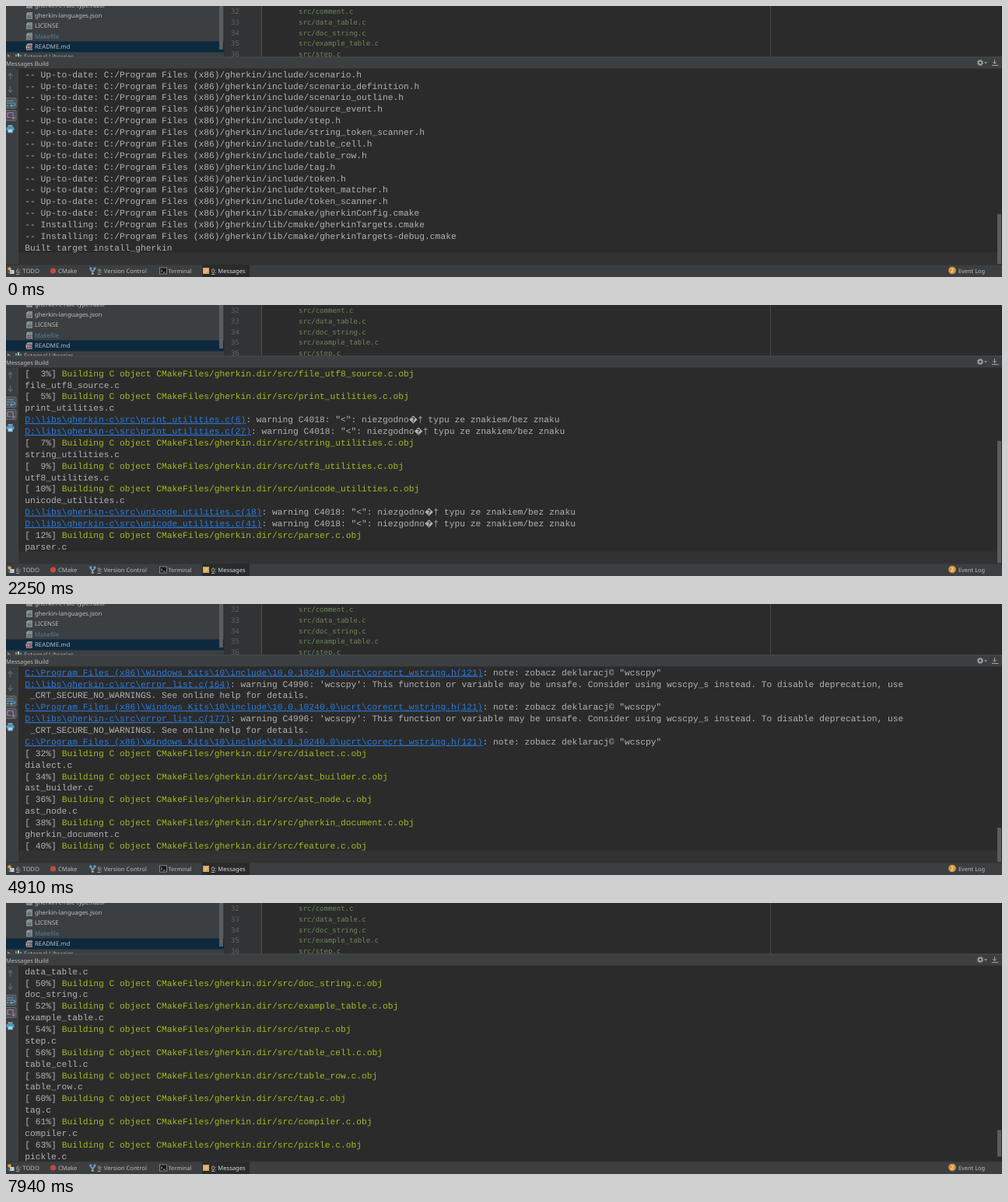
An HTML page that plays this animation: 1280 px wide and 349 px high, repeating every 8000 ms.

```html
<!DOCTYPE html>
<html lang="en">
<head>
<meta charset="utf-8">
<title>Messages Build</title>
<style>
  html, body { margin: 0; width: 100%; height: 100%; overflow: hidden; background: #2b2b2b; }
  svg { display: block; width: 1280px; height: 349px; }
  text { white-space: pre; text-rendering: geometricPrecision; }
  .ui { font-family: "Noto Sans", "Open Sans", sans-serif; font-size: 7.8px; fill: #bbb; }
  .bar { font-size: 7.6px; }
  .code { font-family: "DejaVu Sans Mono", monospace; font-size: 9px; fill: #6a8759; }
  .code .num { fill: #606366; }
  .log { font-family: "Liberation Mono", monospace; font-size: 11.27px; fill: #b2b2b2; }
  .build { fill: #a3b922; }
  .scan { fill: #ae8abe; font-weight: bold; }
  .link { fill: #287bde; text-decoration: underline; }
  .key { text-decoration: underline; }
</style>
</head>
<body>
<svg viewBox="0 0 1280 349">
  <defs>
    <clipPath id="topClip"><rect width="1280" height="65.5"/></clipPath>
    <clipPath id="logClip"><rect x="16" y="81" width="1264" height="251.5"/></clipPath>
    <g id="file">
      <path d="M2.5 0H8V9H0V2.5z" fill="#7f898f"/>
      <path d="M0 2.5L2.5 0V2.5z" fill="#aab2b7"/>
    </g>
  </defs>

  <!-- project tree and editor -->
  <g clip-path="url(#topClip)">
    <rect width="280" height="66" fill="#3c3f41"/>
    <rect y="45.5" width="280" height="14" fill="#0d293e"/>
    <rect x="274" width="5" height="56" fill="#5b5d5f"/>
    <rect x="280" width="1" height="66" fill="#2f3133"/>
    <rect x="281" width="47" height="66" fill="#313335"/>
    <rect x="328" width="1" height="66" fill="#505050"/>
    <rect x="982" width="1" height="66" fill="#4a4a4a"/>
    <g class="ui">
      <use href="#file" x="26" y="-6"/>
      <use href="#file" x="26" y="8"/>
      <use href="#file" x="26" y="21"/>
      <use href="#file" x="26" y="34.5"/>
      <use href="#file" x="26" y="48"/>
      <path d="M27.5 13h5M27.5 15h5M27.5 26h5M27.5 28h5M27.5 39.5h5M27.5 41.5h5" stroke="#4c5459" stroke-width=".8"/>
      <rect x="25" y="51" width="9" height="4.5" fill="#7d4a52"/>
      <path d="M26.5 54.7v-2.7l1.5 1.5 1.5-1.5v2.7M32 52v2.5" stroke="#ddd" stroke-width=".7" fill="none"/>
      <text x="37" y="2">gherkin-c-rule-type.razor</text>
      <text x="37" y="15.3">gherkin-languages.json</text>
      <text x="37" y="28.4">LICENSE</text>
      <text x="37" y="41.8" fill="#527ca2">Makefile</text>
      <text x="37" y="55.1">README.md</text>
      <path d="M2 62.5l4 2.5-4 2.5z" fill="#9a9da0"/>
      <path d="M12 62h2v6h-2z" fill="#6fa35c"/>
      <path d="M15 61h2v7h-2z" fill="#b9c0c5"/>
      <path d="M18 63h2v5h-2z" fill="#4f9fc9"/>
      <text x="23" y="68.3">External Libraries</text>
    </g>
    <g class="code" id="editor"></g>
  </g>

  <!-- tool window header -->
  <rect y="65.5" width="1280" height="15.5" fill="#3c3f41"/>
  <rect y="65.5" width="1280" height="1" fill="#4a4d4f"/>
  <rect y="80" width="1280" height="1" fill="#323436"/>
  <text class="ui" x="0" y="76.6" style="font-size:7.5px">Messages Build</text>
  <circle cx="1252" cy="73" r="2.4" fill="none" stroke="#a0a2a4" stroke-width="1.6"/>
  <circle cx="1252" cy="73" r="3.7" fill="none" stroke="#a0a2a4" stroke-dasharray="1.45 1.456"/>
  <path d="M1257 72.2h4l-2 2.4z" fill="#a0a2a4"/>
  <path d="M1270.5 69v5M1268.3 72l2.2 2.4 2.2-2.4M1267 76.5h8.5" fill="none" stroke="#a0a2a4"/>

  <!-- side buttons -->
  <rect y="81" width="16" height="252" fill="#3c3f41"/>
  <path d="M5.5 94.5v-7M2.5 90l3-3.2 3 3.2M5.5 103.5v7M2.5 108l3 3.2 3-3.2" fill="none" stroke="#626567" stroke-width="1.4"/>
  <g fill="#4c5052" stroke="#6b6e70">
    <rect x="-.5" y="118.5" width="13.5" height="13" rx="1.5"/>
    <rect x="-.5" y="134.5" width="13.5" height="13" rx="1.5"/>
  </g>
  <path d="M1 122h9M1 125h8.5q2 0 2 1.7t-2 1.7H6M1 128.4h2.5M7.5 126.7l-2 1.7 2 1.7" fill="none" stroke="#5fa4cc" stroke-width="1.1"/>
  <path d="M2 137.5h7v4M2 137.5v6h4M9.5 141v4M7.5 143.3l2 2 2-2" fill="none" stroke="#a874b8" stroke-width="1.2"/>
  <rect x="2.5" y="153.5" width="6" height="2" fill="#8bb8d2"/>
  <rect x=".5" y="156" width="10" height="4.5" rx="1" fill="#4a9cc9"/>
  <rect x="2.5" y="158.5" width="6" height="4.5" fill="#c3ccd1" stroke="#4a9cc9" stroke-width=".8"/>

  <!-- build output -->
  <g clip-path="url(#logClip)">
    <rect id="caret" x="16" width="1264" height="14.88" fill="#323232"/>
    <g class="log" id="old"></g>
    <g class="log" id="log"></g>
    <rect id="thumb" x="1274" width="5" fill="#5b5d5f"/>
  </g>

  <!-- bottom bar -->
  <rect y="332.5" width="1280" height="17" fill="#3c3f41"/>
  <rect y="332.5" width="1280" height="1" fill="#2f3133"/>
  <rect x="252" y="333" width="61" height="16" fill="#292b2c"/>
  <g class="ui bar">
    <circle cx="4.5" cy="338.5" r="2.3" fill="#d9a04a"/>
    <rect x="5" y="340" width="5.5" height="5" fill="#c9d0d4"/>
    <path d="M2.5 342l2 2.5 3.5-3" fill="none" stroke="#5a9fd0"/>
    <text x="13" y="344"><tspan class="key">6</tspan>: TODO</text>
    <circle cx="60.5" cy="341" r="3.6" fill="#c9483f"/>
    <text x="67" y="344">CMake</text>
    <path d="M109 338.5q0 3 2.3 3t2.3-3M111.3 341.5v3" fill="none" stroke="#9aa7b0" stroke-width="1.3"/>
    <circle cx="108.8" cy="338" r="1.7" fill="#5a9fd0"/>
    <circle cx="114" cy="338" r="1.7" fill="#5a9fd0"/>
    <circle cx="111.3" cy="344.5" r="1.6" fill="#9aa7b0"/>
    <text x="117.5" y="344"><tspan class="key">9</tspan>: Version Control</text>
    <rect x="197.5" y="337" width="9" height="8" fill="#161819" stroke="#8f979c" stroke-width=".8"/>
    <path d="M199 339.5l1.8 1.5-1.8 1.5M202 343h2.5" fill="none" stroke="#ddd" stroke-width=".8"/>
    <text x="208.5" y="344" style="font-size:7.3px">Terminal</text>
    <rect x="253" y="337" width="8" height="8" fill="#d9a45b"/>
    <path d="M254.5 339.5h5M254.5 341.3h5M254.5 343h3" stroke="#f2dcb8" stroke-width=".7"/>
    <text x="264" y="344" fill="#d8d8d8"><tspan class="key">0</tspan>: Messages</text>
    <circle cx="1216" cy="340.5" r="4.8" fill="#d9963a"/>
    <text x="1216" y="343.2" text-anchor="middle" style="font-size:7px;fill:#fff">2</text>
    <text x="1224" y="344" style="font-size:7.4px">Event Log</text>
  </g>
</svg>

<script>
const SVG = "http://www.w3.org/2000/svg";
const LINE = 14.88, TOP = 81, VIEW = 251.5, BASE = 12.1, LOOP = 8000;
const $ = id => document.getElementById(id);

function add(parent, tag, attrs, content = "") {
  const node = document.createElementNS(SVG, tag);
  for (const key in attrs) node.setAttribute(key, attrs[key]);
  node.textContent = content;
  parent.append(node);
  return node;
}

["comment", "data_table", "doc_string", "example_table", "step"].forEach((name, i) => {
  const y = 10.4 + i * 13.6;
  add($("editor"), "text", { x: 289, y, class: "num" }, String(32 + i));
  add($("editor"), "text", { x: 376, y }, `src/${name}.c`);
});

// A log line is a list of [text, class] runs.
const plain = text => [[text, ""]];
const linked = (path, rest) => [[path, "link"], [rest, ""]];
const source = (name, row) => `D:\\libs\\gherkin-c\\src\\${name}.c(${row})`;

const unsafe = (name, row, func, header) => [
  linked(source(name, row), `: warning C4996: '${func}': This function or variable may be unsafe. ` +
    `Consider using ${func}_s instead. To disable deprecation, use`),
  plain(" _CRT_SECURE_NO_WARNINGS. See online help for details."),
  linked(`C:\\Program Files (x86)\\Windows Kits\\10\\include\\10.0.10240.0\\ucrt\\${header}`,
    `: note: zobacz deklaracj© "${func}"`)
];
const signs = (name, row) =>
  linked(source(name, row), ': warning C4018: "<": niezgodno\uFFFD† typu ze znakiem/bez znaku');

const warnings = {
  file_reader: unsafe("file_reader", 23, "fopen", "stdio.h(205)"),
  print_utilities: [6, 27].map(row => signs("print_utilities", row)),
  unicode_utilities: [18, 41].map(row => signs("unicode_utilities", row)),
  file_token_scanner: unsafe("file_token_scanner", 29, "fopen", "stdio.h(205)"),
  string_token_scanner: [linked(source("string_token_scanner", 17),
    ": warning C4028: formalny parametr 1 r˘Ini si© od deklaracji")],
  error_list: [41, 56, 68, 79, 91, 103, 114, 137, 139, 154, 164, 177]
    .flatMap(row => unsafe("error_list", row, "wcscpy", "corecrt_wstring.h(121)"))
};

const files = ("file_reader file_utf8_source print_utilities string_utilities utf8_utilities " +
  "unicode_utilities parser token_scanner file_token_scanner string_token_scanner token_matcher " +
  "token token_queue gherkin_line item_queue error error_list dialect ast_builder ast_node " +
  "gherkin_document feature scenario scenario_outline background comment data_table doc_string " +
  "example_table step table_cell table_row tag compiler pickle pickle_tag").split(" ");

const buildLines = [
  plain("cmake.exe --build D:\\libs\\gherkin-c\\cmake-build-debug --target install_gherkin"),
  plain("-- Configuring done"),
  plain("-- Generating done"),
  plain("-- Build files have been written to: D:/libs/gherkin-c/cmake-build-debug"),
  [["Scanning dependencies of target gherkin", "scan"]],
  ...files.flatMap((name, i) => [
    [[`[${String(Math.floor((i + 1) * 100 / 55)).padStart(3)}%] `, ""],
     [`Building C object CMakeFiles/gherkin.dir/src/${name}.c.obj`, "build"]],
    plain(name + ".c"),
    ...(warnings[name] || [])
  ])
];

const ROOT = "C:/Program Files (x86)/gherkin/";
const headers = "scenario scenario_definition scenario_outline source_event step string_token_scanner " +
  "table_cell table_row tag token token_matcher token_scanner";
const oldLines = [
  ...headers.split(" ").map(name => `-- Up-to-date: ${ROOT}include/${name}.h`),
  `-- Up-to-date: ${ROOT}lib/cmake/gherkinConfig.cmake`,
  `-- Installing: ${ROOT}lib/cmake/gherkinTargets.cmake`,
  `-- Installing: ${ROOT}lib/cmake/gherkinTargets-debug.cmake`,
  "Built target install_gherkin"
].map(plain);
const OLD_TOTAL = 65;

function fill(group, lines, first) {
  return lines.map((runs, i) => {
    const row = add(group, "text", { x: 24.3, y: (first + i) * LINE + BASE });
    for (const [text, cls] of runs) add(row, "tspan", cls ? { class: cls } : {}, text);
    return row;
  });
}
fill($("old"), oldLines, OLD_TOTAL - oldLines.length);
const rows = fill($("log"), buildLines, 0);

// [time, lines printed, lines the view has scrolled to (if it lags behind)]
const steps = [
  [0, OLD_TOTAL], [80, 1], [230, 4], [520, 7], [840, 12], [1080, 17],
  [1430, 18], [1660, 20], [1740, 21], [1890, 22], [1960, 24],
  [2250, 26], [2400, 28], [2550, 30], [2780, 34], [2930, 37], [3080, 41], [3240, 43],
  [3550, 45], [3700, 47], [3850, 50], [4080, 86, 82.6], [4160, 87],
  [4450, 91], [4680, 93], [4910, 95], [5140, 96], [5370, 97],
  [5840, 99], [6070, 101], [6300, 105], [6520, 109], [6740, 112, 109], [6830, 113],
  [7110, 117], [7340, 119], [7710, 121], [7940, 124, 121]
];

function show(index) {
  const [, total, seen = total] = steps[index];
  const scroll = Math.max(0, (seen + 1) * LINE - VIEW);
  const height = (total + 1) * LINE;
  const shift = `translate(0 ${TOP - scroll})`;
  $("old").style.display = index ? "none" : "";
  $("log").style.display = index ? "" : "none";
  $("old").setAttribute("transform", shift);
  $("log").setAttribute("transform", shift);
  rows.forEach((row, i) => row.style.display = i < total ? "" : "none");
  $("caret").setAttribute("y", TOP - scroll + total * LINE);
  $("thumb").setAttribute("y", TOP + scroll / height * VIEW);
  $("thumb").setAttribute("height", height > VIEW ? VIEW * VIEW / height : 0);
}

const start = performance.now();
let current = -1;
function tick() {
  const time = (performance.now() - start) % LOOP;
  const index = steps.findLastIndex(step => step[0] <= time);
  if (index !== current) show(current = index);
  requestAnimationFrame(tick);
}
tick();
</script>
</body>
</html>
```
